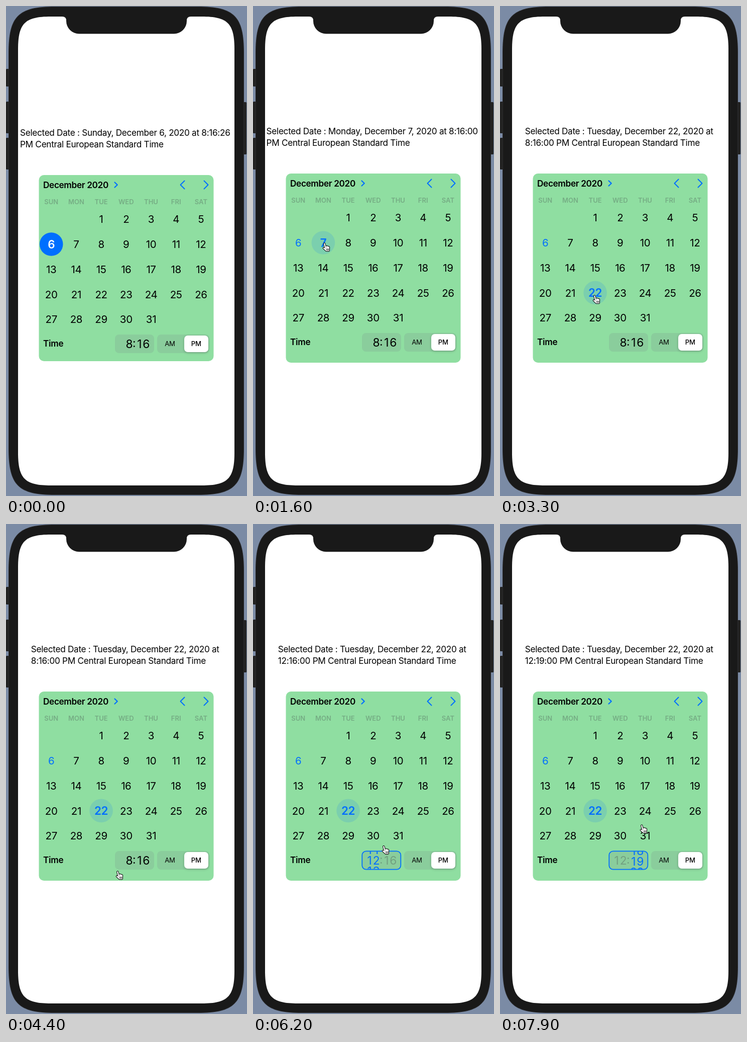
Animation, 480 px wide and 974 px high, one loop 8000 ms. Source, as an HTML page with a canvas:

```html
<!DOCTYPE html>
<html lang="en">
<head>
<meta charset="utf-8">
<title>Date picker</title>
<style>
html, body { margin: 0; width: 100%; height: 100%; overflow: hidden; background: #7b8ba5; }
canvas { display: block; width: 480px; height: 974px; }
</style>
</head>
<body>
<canvas id="stage"></canvas>
<script>
const W = 480, H = 974, LOOP = 8000;
const BLUE = '#006fff', GREEN = '#8fdea1', BLACK = '#000', BODY = '#191919';
const FAINT = 'rgba(60,60,67,.3)', FIELD = 'rgba(110,116,128,.16)';
const COL = 49.7, WHEEL_ROW = 21, MIDDLE = 239.5, LABEL_SIZE = 17.2;
const WEEKDAYS = ['Sunday', 'Monday', 'Tuesday', 'Wednesday', 'Thursday', 'Friday', 'Saturday'];

const canvas = document.getElementById('stage');
const dpr = window.devicePixelRatio || 1;
canvas.width = W * dpr;
canvas.height = H * dpr;
const ctx = canvas.getContext('2d');

// Pointer stops: time, x, y
const STOPS = [
  [300, 436, 942], [950, 150, 471], [1600, 139, 470], [2400, 168, 475],
  [3200, 186, 574], [3600, 180, 574], [4400, 219, 689], [5120, 240, 661],
  [5600, 245, 604], [6800, 269, 673], [7200, 272, 661], [7900, 279, 597]
];

function ease(t, t0, t1, a, b) {
  const p = Math.min(1, Math.max(0, (t - t0) / (t1 - t0)));
  return a + (b - a) * p * p * (3 - 2 * p);
}

function stateAt(t) {
  return {
    day: t < 1600 ? 6 : t < 3200 ? 7 : 22,
    hour: t < 6000 ? 8 : 12,
    minute: t < 7800 ? 16 : 19,
    second: t < 1600 ? '26' : '00',
    hourWheel: ease(t, 5120, 5920, 8, 12),
    minuteWheel: ease(t, 7200, 8000, 16, 19),
    hourOn: t >= 5000 && t < 6300,
    minuteOn: t >= 7100
  };
}

function box(x, y, w, h, r, fill) {
  ctx.beginPath();
  ctx.roundRect(x, y, w, h, r);
  ctx.fillStyle = fill;
  ctx.fill();
}

// Rounded box with continuous corners
function smoothBox(x, y, w, h, r, fill) {
  const e = r * 1.45, k = e * 0.205;
  ctx.beginPath();
  for (const [cx, cy, sx, sy] of [[x, y, 1, 1], [x + w, y, -1, 1], [x + w, y + h, -1, -1], [x, y + h, 1, -1]]) {
    const side = [cx, cy + sy * e, cx, cy + sy * k];
    const flat = [cx + sx * k, cy, cx + sx * e, cy];
    const [x0, y0, x1, y1, x2, y2, x3, y3] = sx === sy
      ? [...side, ...flat]
      : [flat[2], flat[3], flat[0], flat[1], side[2], side[3], side[0], side[1]];
    ctx.lineTo(x0, y0);
    ctx.bezierCurveTo(x1, y1, x2, y2, x3, y3);
  }
  ctx.fillStyle = fill;
  ctx.fill();
}

function chevron(x, y, dx, dy, width) {
  ctx.beginPath();
  ctx.moveTo(x - dx, y - dy);
  ctx.lineTo(x, y);
  ctx.lineTo(x - dx, y + dy);
  ctx.strokeStyle = BLUE;
  ctx.lineWidth = width;
  ctx.lineCap = ctx.lineJoin = 'round';
  ctx.stroke();
}

function setFont(size, weight = 400, gap = -0.0175) {
  ctx.font = `${weight} ${size}px Inter, "Open Sans", sans-serif`;
  ctx.letterSpacing = gap * size + 'px';
}

// y is the middle of the capitals
function text(str, x, y, size, { weight, color = BLACK, align = 'left', gap } = {}) {
  setFont(size, weight, gap);
  ctx.textAlign = align;
  ctx.fillStyle = color;
  ctx.fillText(str, x, y + size * 0.3635);
}

function phone() {
  ctx.fillStyle = '#7b8ba5';
  ctx.fillRect(0, 0, W, H);
  for (const [x, y, h] of [[0, 125, 35], [0, 190, 63], [0, 262, 63], [473, 191, 104]]) {
    box(x, y, 6, h, 1.5, '#222');
  }
  smoothBox(5, 1, 469, 971, 64, '#2b2b2d');
  smoothBox(6, 2, 467, 969, 63, BODY);
  smoothBox(24, 21, 431, 932, 45, '#fff');

  const left = 120, right = 360, bottom = 55.3, fillet = 8;
  ctx.beginPath();
  ctx.moveTo(left - fillet, 20);
  ctx.lineTo(left - fillet, 21);
  ctx.quadraticCurveTo(left, 21, left, 21 + fillet);
  ctx.arcTo(left, bottom, MIDDLE, bottom, 25.5);
  ctx.arcTo(right, bottom, right, 21, 25.5);
  ctx.lineTo(right, 21 + fillet);
  ctx.quadraticCurveTo(right, 21, right + fillet, 21);
  ctx.lineTo(right + fillet, 20);
  ctx.fillStyle = BODY;
  ctx.fill();
}

function label({ day, hour, minute, second }) {
  const words = `Selected Date : ${WEEKDAYS[(day + 1) % 7]}, December ${day}, 2020 at ` +
    `${hour}:${minute}:${second} PM Central European Standard Time`;
  setFont(LABEL_SIZE);
  const lines = [''];
  for (const word of words.split(' ')) {
    const last = lines.length - 1;
    if (ctx.measureText(lines[last] + word).width > 431) lines.push(word + ' ');
    else lines[last] += word + ' ';
  }
  const width = Math.max(...lines.map(l => ctx.measureText(l).width));
  lines.forEach((l, i) => text(l, MIDDLE - width / 2, 249 + i * 23, LABEL_SIZE));
}

function calendar(picked) {
  text('December 2020', 74, 352.5, 17.2, { weight: 600, gap: -0.02 });
  chevron(221.8, 352.5, 5.3, 5, 2.2);
  chevron(347.5, 352.5, -8, 8, 2);
  chevron(402.5, 352.5, 8, 8, 2);

  WEEKDAYS.forEach((name, i) => text(name.slice(0, 3).toUpperCase(), 90.2 + i * COL, 386.5, 13,
    { weight: 600, color: FAINT, align: 'center', gap: 0 }));

  for (let day = 1; day <= 31; day++) {
    const cell = day + 1;
    const x = 90.2 + cell % 7 * COL;
    const y = 421 + Math.floor(cell / 7) * COL;
    const on = day === picked, today = day === 6;
    if (on) {
      ctx.beginPath();
      ctx.arc(x, y - 0.2, 23.3, 0, Math.PI * 2);
      ctx.fillStyle = today ? BLUE : 'rgba(0,111,255,.14)';
      ctx.fill();
    }
    const color = on && today ? '#fff' : on || today ? BLUE : BLACK;
    text(day, x, y, on ? 22.4 : 20.5, { weight: on ? 600 : 400, color, align: 'center' });
  }
}

function wheel(value, right, color, active) {
  const near = Math.round(value);
  for (let n = near - 1; n <= near + 1; n++) {
    if (!active && n !== near) continue;
    const y = 668.3 + (n - value) * WHEEL_ROW;
    [...String(n)].reverse().forEach((d, i) =>
      text(d, right - i * 13.4, y, 22.8, { color, align: 'center', gap: 0 }));
  }
}

function timeRow({ hourWheel, minuteWheel, hourOn, minuteOn }) {
  const focus = hourOn || minuteOn, idle = focus ? FAINT : BLACK;
  text('Time', 74, 668, 17.2, { weight: 600 });

  box(217, 650, 78, 37, 8, FIELD);
  ctx.save();
  ctx.clip();
  wheel(hourWheel, 245.6, hourOn ? BLUE : idle, hourOn);
  text(':', 255.4, 667, 22.8, { color: idle, align: 'center', gap: 0 });
  wheel(minuteWheel, 279.4, minuteOn ? BLUE : idle, minuteOn);
  ctx.restore();
  if (focus) {
    ctx.beginPath();
    ctx.roundRect(217.3, 650.3, 77, 36.4, 8);
    ctx.strokeStyle = BLUE;
    ctx.lineWidth = 1.8;
    ctx.stroke();
  }

  box(301, 650, 104, 37, 8, FIELD);
  ctx.save();
  ctx.shadowColor = 'rgba(0,0,0,.22)';
  ctx.shadowBlur = 5 * dpr;
  ctx.shadowOffsetY = 1.5 * dpr;
  box(355, 652, 48, 33, 7, '#fff');
  ctx.restore();
  text('AM', 326.5, 668.5, 13.2, { align: 'center' });
  text('PM', 378.7, 668.5, 13.2, { weight: 500, align: 'center' });
}

function strokeLine(x0, y0, x1, y1, width, color) {
  ctx.beginPath();
  ctx.moveTo(x0, y0);
  ctx.lineTo(x1, y1);
  ctx.lineWidth = width;
  ctx.strokeStyle = color;
  ctx.stroke();
}

// Each finger is a thick line, outlined by a thicker one below
function hand(x, y) {
  ctx.save();
  ctx.translate(x, y);
  ctx.lineCap = 'round';
  for (const [width, color] of [[4.3, BLACK], [2.3, '#fff']]) {
    strokeLine(3.2, 2.5, 6.2, 14, width, color);
    strokeLine(2, 11.4, 7, 15.8, width, color);
    for (let i = 0; i < 3; i++) {
      strokeLine(7.7 + i * 2.1, 8 + i * 0.7, 7.7 + i * 2, 16.2, width, color);
    }
  }
  for (let i = 0; i < 3; i++) strokeLine(7.6 + i * 2, 12.5, 7.6 + i * 2, 15.5, 0.8, BLACK);
  ctx.restore();
}

function pointer(t) {
  if (t < 100) return;
  const i = STOPS.findIndex(s => t <= s[0]);
  const b = STOPS[i < 0 ? STOPS.length - 1 : i];
  const a = i > 0 ? STOPS[i - 1] : [0, b[1], b[2]];
  hand(ease(t, a[0], b[0], a[1], b[1]), ease(t, a[0], b[0], a[2], b[2]));
}

function draw(t) {
  const state = stateAt(t);
  const lift = state.day === 6 ? 3 : 0;
  ctx.setTransform(dpr, 0, 0, dpr, 0, 0);
  phone();
  box(65.5, 333 + lift, 348, 376 - 2 * lift, 10, GREEN);
  ctx.save();
  ctx.translate(0, lift);
  label(state);
  calendar(state.day);
  timeRow(state);
  ctx.restore();
  pointer(t);
}

const start = performance.now();
function tick() {
  draw((performance.now() - start) % LOOP);
  requestAnimationFrame(tick);
}
tick();
</script>
</body>
</html>
```
